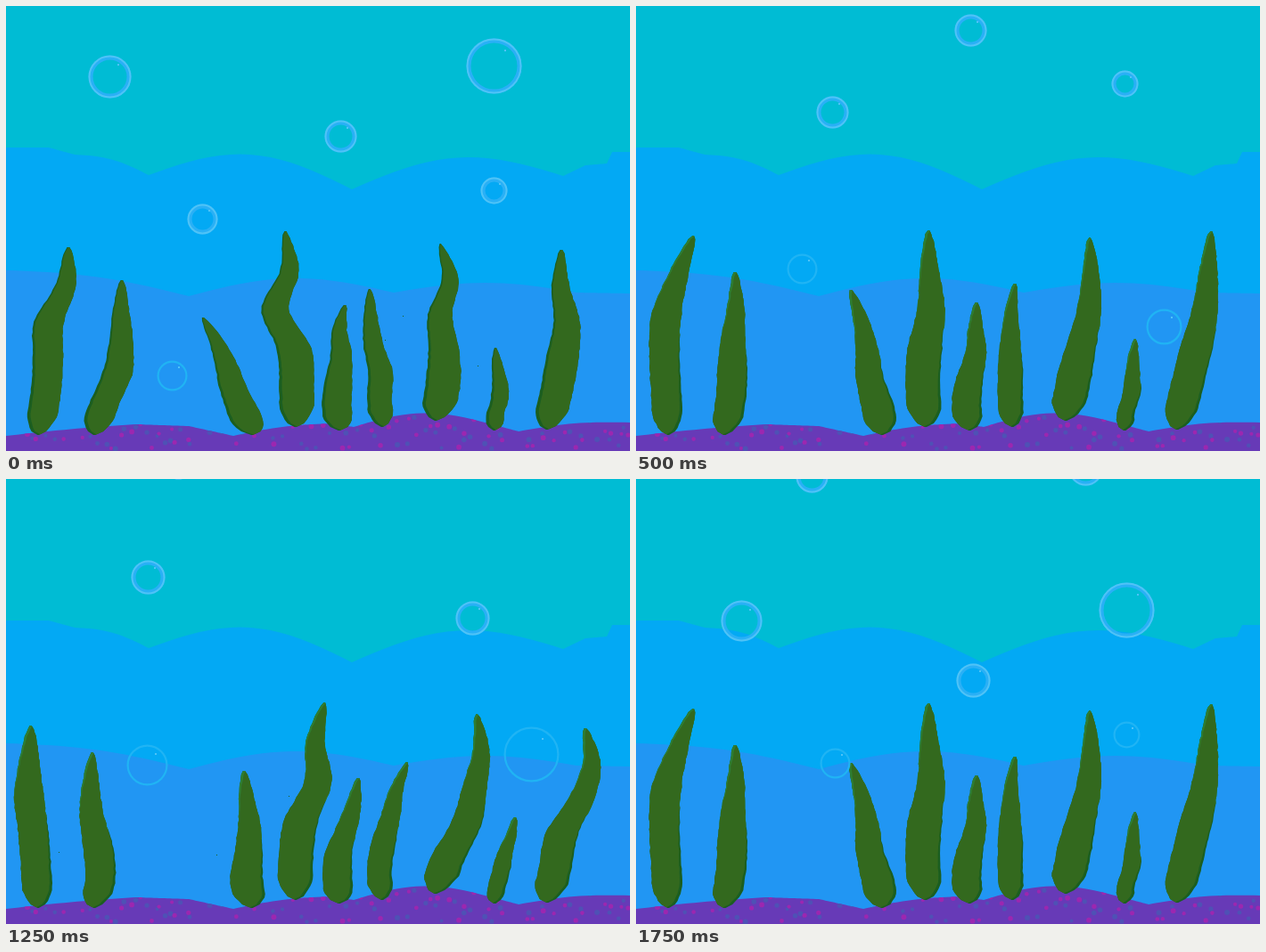
These frames come from a looping animation (700 px wide and 500 px high, 2000 ms). An HTML page with a canvas:

```html
<!DOCTYPE html>
<html lang="en">
<head>
<meta charset="utf-8">
<title>Seaweed</title>
<style>
html, body { margin: 0; width: 100%; height: 100%; overflow: hidden; background: #00bcd4; }
canvas { display: block; }
</style>
</head>
<body>
<canvas id="stage" width="700" height="500"></canvas>
<script>
const W = 700, H = 500, STEP = 250, LOOP = 2000;
const ctx = document.getElementById('stage').getContext('2d');
const LEAF = '#33691e', SHADE = '#1b5e20', RIM = '#2e7d32';

function seeded(seed) {
  return () => (seed = (seed * 16807) % 2147483647) / 2147483647;
}

// Arches between key points [x, y, h]; h is the height of the arch that ends there.
function ridge(keys) {
  const path = new Path2D();
  path.moveTo(keys[0][0], keys[0][1]);
  for (let i = 1; i < keys.length; i++) {
    const [x0, y0] = keys[i - 1], [x1, y1, h = 0] = keys[i];
    for (let t = 0.05; t < 1.01; t += 0.05) {
      path.lineTo(x0 + (x1 - x0) * t, y0 + (y1 - y0) * t - h * Math.sin(Math.PI * t));
    }
  }
  path.lineTo(W, H);
  path.lineTo(0, H);
  return path;
}

function makeSea() {
  const cv = document.createElement('canvas');
  cv.width = W;
  cv.height = H;
  const c = cv.getContext('2d');
  const fill = (color, path) => {
    c.fillStyle = color;
    c.fill(path);
  };
  const ground = ridge([[0, 483], [145, 470, 1], [205, 472], [255, 483], [365, 469, 3], [390, 473], [545, 470, 14], [575, 478], [700, 468, 4]]);
  c.fillStyle = '#00bcd4';
  c.fillRect(0, 0, W, H);
  fill('#03a9f4', ridge([[0, 159], [48, 159], [77, 167], [160, 190, 6], [388, 206, 31], [625, 191, 28], [650, 179], [674, 177], [680, 164], [700, 164]]));
  fill('#2196f3', ridge([[0, 297], [205, 326, 7], [435, 322, 18], [640, 322, 11], [700, 323]]));
  fill('#673ab7', ground);
  c.clip(ground);
  const rnd = seeded(77);
  for (let i = 0; i < 130; i++) {
    c.fillStyle = i % 2 ? '#9c27b0' : '#4f51b5';
    c.beginPath();
    c.arc(i * 5.4 + rnd() * 8, 462 + rnd() * 36, 2 + rnd(), 0, 7);
    c.fill();
  }
  return cv;
}

// Catmull-Rom through evenly spaced values.
function along(vals, u) {
  const n = vals.length - 1, i = Math.min(n - 1, Math.floor(u * n)), t = u * n - i;
  const b = vals[i], c = vals[i + 1];
  const a = i ? vals[i - 1] : 2 * b - c;
  const d = i + 2 <= n ? vals[i + 2] : 2 * c - b;
  return b + t * (c - a + t * (2 * a - 5 * b + 4 * c - d + t * (3 * (b - c) + d - a))) / 2;
}

function leafPath(spine, top, base, width, peak) {
  const rnd = seeded(Math.round(top * base));
  const left = [], right = [], rows = Math.round((base - top) / 4);
  for (let i = 0; i <= rows; i++) {
    const u = i / rows, y = top + (base - top) * u, x = along(spine, u);
    const grow = Math.min(1, (u / peak) ** 0.6);
    const close = Math.min(1, Math.sqrt((1 - u) / 0.1));
    const half = 1 + width / 2 * grow * close;
    left.push([x - half + rnd() - 0.5, y]);
    right.unshift([x + half + rnd() - 0.5, y]);
  }
  const path = new Path2D();
  for (const [x, y] of left.concat(right)) path.lineTo(x, y);
  path.closePath();
  return path;
}

const poses = [[], [], []];

// Root, widest span and where it is reached; then per pose the top and the spine from the tip down.
function weed(root, base, width, peak, ...sways) {
  sways.forEach(([top, ...xs], i) => {
    poses[i].push({ path: leafPath([...xs, root], top, base, width, peak), top, base });
  });
}

weed(36, 482, 32, 0.4, [271, 70, 67, 48, 47, 44], [258, 64, 47, 34, 32, 34], [277, 28, 26, 26, 31, 34]);
weed(99, 482, 32, 0.6, [308, 130, 129, 129, 125, 110], [299, 111, 112, 109, 108, 106], [307, 97, 95, 96, 103, 106]);
weed(276, 482, 35, 0.8, [350, 221, 236, 247, 255, 266], [319, 241, 252, 259, 262, 271], [328, 267, 270, 273, 272, 270]);
weed(325, 473, 37, 0.6, [253, 313, 318, 302, 323, 326], [252, 328, 329, 331, 324, 322], [251, 357, 347, 350, 331, 325]);
weed(374, 477, 31, 0.7, [336, 380, 374, 376, 373, 371], [333, 382, 381, 381, 374, 371], [336, 395, 390, 382, 373, 372]);
weed(422, 473, 26, 0.6, [318, 408, 409, 412, 420, 419], [312, 425, 421, 420, 420, 420], [318, 450, 438, 431, 423, 419]);
weed(482, 466, 37, 0.75, [267, 487, 498, 487, 491, 490], [260, 509, 510, 508, 499, 490], [264, 528, 533, 526, 517, 496]);
weed(548, 477, 18, 0.55, [384, 549, 551, 554, 554, 549], [374, 560, 558, 557, 556, 550], [380, 571, 567, 560, 556, 551]);
weed(607, 476, 35, 0.6, [274, 623, 622, 629, 624, 617], [253, 645, 642, 638, 628, 617], [280, 650, 657, 646, 624, 616]);

// Sliding the leaf colour sideways inside its outline leaves a shaded edge.
function drawLeaf({ path, top, base }, upper, lower) {
  ctx.save();
  ctx.clip(path);
  ctx.fillStyle = SHADE;
  ctx.fillRect(0, 0, W, H);
  if (lower < 0) {
    ctx.fillStyle = RIM;
    ctx.fillRect(0, 0, W, (top + base) / 2);
  }
  const lean = (lower - upper) / (base - top);
  ctx.transform(1, 0, lean, 1, upper - lean * top, 0);
  ctx.fillStyle = LEAF;
  ctx.fill(path);
  ctx.restore();
}

// Each scene holds for two steps; its bubbles drift by (dx, dy) on the second.
const scenes = [
  { pose: 0, dx: 0, dy: -40, specks: [[445, 348], [425, 375], [529, 404]],
    bubbles: [[116, 79, 24], [547, 67, 31], [375, 146, 18], [547, 207, 15], [220, 239, 17], [186, 415, 17]] },
  { pose: 1, dx: -8, dy: -60, specks: [],
    bubbles: [[375, 27, 18], [548, 87, 15], [220, 119, 18], [186, 295, 17], [592, 360, 20]] },
  { pose: 2, dx: 0, dy: -40, specks: [[59, 419], [317, 356], [236, 422]],
    bubbles: [[193, 22, 18], [159, 150, 19], [523, 196, 19], [158, 361, 23], [589, 349, 31]] },
  { pose: 1, dx: 0, dy: -38, specks: [],
    bubbles: [[197, 35, 18], [504, 26, 19], [118, 197, 23], [550, 185, 31], [378, 264, 19], [550, 325, 15], [223, 357, 17]] }
];

function ring(x, y, r, width, color) {
  ctx.strokeStyle = color;
  ctx.lineWidth = width;
  ctx.beginPath();
  ctx.arc(x, y, r - width / 2, 0, 7);
  ctx.stroke();
}

function bubble(x, y, r) {
  if (y > 280) {
    ring(x, y, r, 2.2, '#20b4f4');
  } else {
    ring(x, y, r, 5, '#29b0f6');
    ring(x, y, r, 2, '#4fc3f7');
  }
  ctx.fillStyle = '#4fc3f7';
  ctx.fillRect(Math.round(x + r * 0.36), Math.round(y - r * 0.6), 2, 2);
}

function specks(list) {
  ctx.fillStyle = SHADE;
  for (const [x, y, size = 1] of list) ctx.fillRect(x, y, size, size);
}

const sea = makeSea();
const passing = { 1: [[35, 310, 4]], 3: [[16, 223], [16, 235], [12, 248]] };

function draw(now) {
  const step = Math.floor((now % LOOP) / STEP);
  const { pose, dx, dy, bubbles, specks: dots } = scenes[step >> 1];
  const odd = step & 1;
  ctx.drawImage(sea, 0, 0);
  for (const leaf of poses[pose]) drawLeaf(leaf, pose ? 3 : 1, pose ? -4 : 4);
  specks(dots);
  specks(passing[step] || []);
  for (const [x, y, r] of bubbles) bubble(x + 0.5 + odd * dx, y + 0.5 + odd * dy, r);
}

const start = performance.now();
function tick() {
  draw(performance.now() - start);
  requestAnimationFrame(tick);
}
tick();
</script>
</body>
</html>
```
